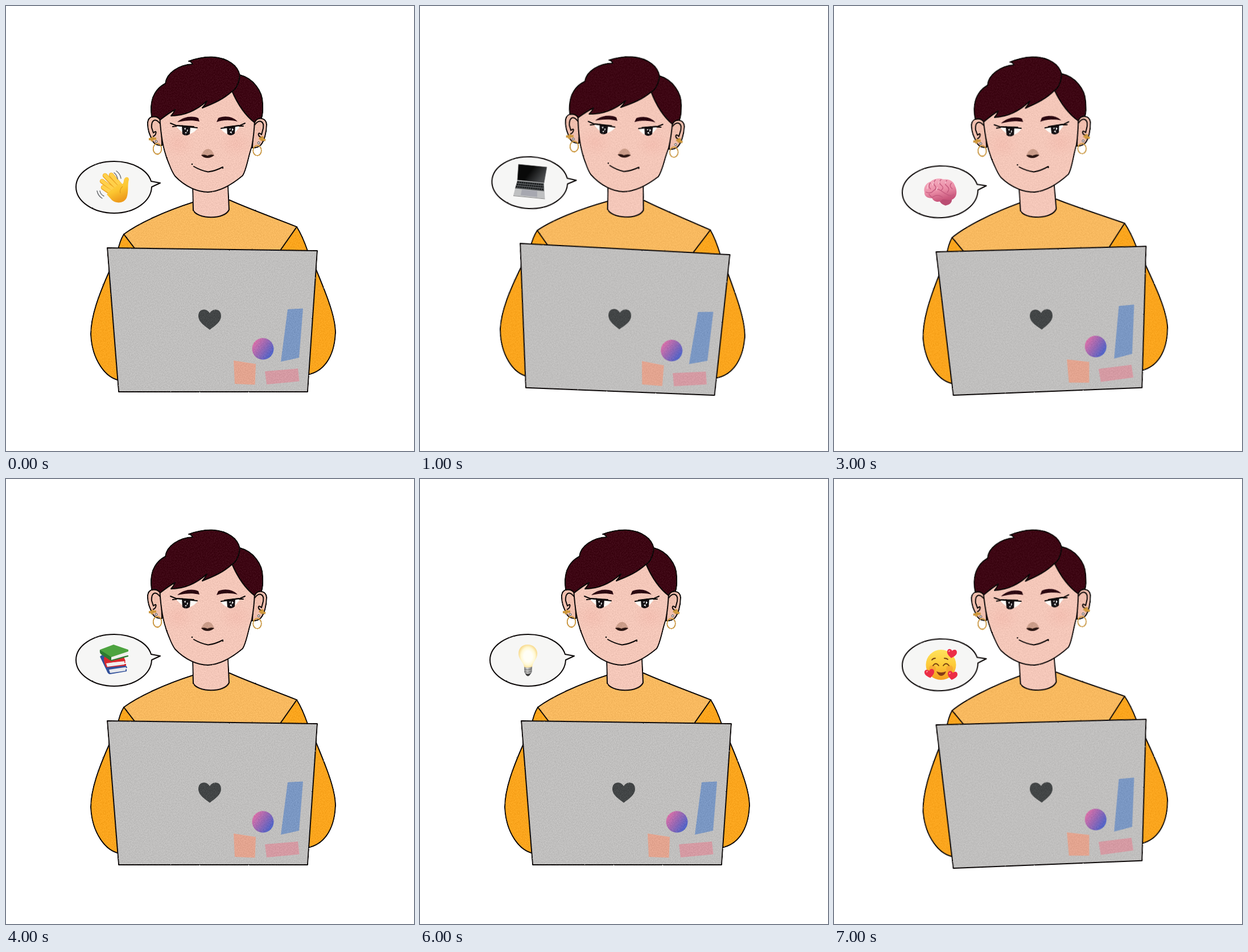
These frames come from a looping animation (717x782 px, 8000 ms). An HTML page:

```html
<!DOCTYPE html>
<html lang="en">
<head>
<meta charset="utf-8">
<title>Laptop greeting</title>
<style>
  html, body { margin: 0; width: 100%; height: 100%; overflow: hidden; background: #fff; }
  svg { display: block; width: 717px; height: 782px; }
  .ink { stroke: #0c0808; stroke-width: 2; stroke-linejoin: round; stroke-linecap: round; }
  .line { fill: none; }
  .skin { fill: #f4c7b9; }
  .ear { fill: #f0bfae; }
  .hair { fill: #3d0613; }
  .shirt { fill: #f8b95f; }
  .sleeve { fill: #fba51d; }
  .gold { fill: none; stroke: #cf983b; stroke-width: 2; }
  .icon { visibility: hidden; }
</style>
</head>
<body>
<svg viewBox="0 0 717 782" xmlns="http://www.w3.org/2000/svg">
  <defs>
    <filter id="grain" filterUnits="userSpaceOnUse" x="100" y="60" width="520" height="650" color-interpolation-filters="sRGB">
      <feTurbulence type="fractalNoise" baseFrequency=".35" numOctaves="1" seed="4" result="wave"/>
      <feDisplacementMap in="SourceGraphic" in2="wave" scale="1.8" xChannelSelector="R" yChannelSelector="G" result="rough"/>
      <feTurbulence type="fractalNoise" baseFrequency=".6" numOctaves="2" seed="9"/>
      <feColorMatrix values="1 0 0 0 0  1 0 0 0 0  1 0 0 0 0  0 0 0 0 1" result="dots"/>
      <feComposite in="rough" in2="dots" operator="arithmetic" k2="1" k3=".16" k4="-.08"/>
      <feComposite in2="rough" operator="in"/>
    </filter>
    <filter id="rough" filterUnits="userSpaceOnUse" x="100" y="250" width="190" height="130" color-interpolation-filters="sRGB">
      <feTurbulence type="fractalNoise" baseFrequency=".35" numOctaves="1" seed="2"/>
      <feDisplacementMap in="SourceGraphic" scale="1.8" xChannelSelector="R" yChannelSelector="G"/>
    </filter>
    <radialGradient id="blush">
      <stop stop-color="#ee9e92" stop-opacity=".2"/><stop offset="1" stop-color="#ee9e92" stop-opacity="0"/>
    </radialGradient>
    <linearGradient id="ball" x1="0" y1=".15" x2="1" y2=".85">
      <stop offset=".1" stop-color="#d66fa8"/><stop offset=".5" stop-color="#9367b4"/><stop offset=".9" stop-color="#4d63c8"/>
    </linearGradient>
    <linearGradient id="palm" x1="0" y1="0" x2=".4" y2="1">
      <stop stop-color="#ffd65a"/><stop offset=".6" stop-color="#fcc631"/><stop offset="1" stop-color="#ee9c1c"/>
    </linearGradient>
    <linearGradient id="smile" x2="0" y2="1">
      <stop stop-color="#ffe25c"/><stop offset=".5" stop-color="#fdcb3a"/><stop offset="1" stop-color="#f39c1f"/>
    </linearGradient>
    <radialGradient id="glass">
      <stop offset=".45" stop-color="#fffef6"/><stop offset=".75" stop-color="#fff8d3"/><stop offset="1" stop-color="#f8dd95"/>
    </radialGradient>
    <linearGradient id="pink" x2=".3" y2="1">
      <stop stop-color="#f7b3c4"/><stop offset=".6" stop-color="#ea8ca6"/><stop offset="1" stop-color="#c9577c"/>
    </linearGradient>
    <linearGradient id="screen" y2=".5">
      <stop offset=".5" stop-color="#090909"/><stop offset="1" stop-color="#4a4c4e"/>
    </linearGradient>
    <linearGradient id="metal">
      <stop stop-color="#777"/><stop offset=".35" stop-color="#d6d6d4"/><stop offset="1" stop-color="#777"/>
    </linearGradient>
    <path id="heart" d="M0,-11 C-4,-20 -20,-21 -20,-6 C-20,4 -9,11 0,18 C9,11 20,4 20,-6 C20,-21 4,-20 0,-11Z"/>
  </defs>

  <g id="figure">
    <g filter="url(#grain)">
      <!-- sleeves and shirt -->
      <g class="ink">
        <path class="sleeve" d="M207,401 Q200,412 196,432 L181,467 C163,508 149,545 149,577 C151,622 175,654 200,658 L240,640 L240,420Z"/>
        <path class="sleeve" d="M511,388 Q521,404 530,430 L545,463 C562,504 579,545 579,574 C577,620 556,643 530,648 L480,630 L480,420Z"/>
        <path class="shirt" d="M328,345 C281,360 232,382 207,401 L227,427 V480 H483 V428 L511,388 C468,371 424,355 393,341Z"/>
        <path class="skin" d="M328,314 L329,359 C337,375 384,376 392,358 L390,312Z"/>
      </g>

      <!-- ears -->
      <g class="ink ear">
        <path d="M273,202 C265,191 251,192 249,204 C248,219 254,229 258,238 Q263,246 274,245Z"/>
        <path d="M435,204 C443,194 457,196 458,208 C458,222 454,237 448,244 Q442,250 433,249Z"/>
        <path class="line" d="M271,207 C262,195 255,201 256,214 L259,223 C266,216 264,227 259,229"/>
        <path class="line" d="M437,209 C445,198 454,202 452,215 L449,226 C442,219 442,229 448,231"/>
      </g>
      <path class="ink skin" d="M270,193 C272,224 275,252 287,279 Q292,292 297,299 C315,318 337,327 355,327 C376,326 397,314 416,298 C423,287 425,267 432,247 Q436,226 437,200 L398,140 H310Z"/>
      <ellipse cx="302" cy="242" rx="30" ry="25" fill="url(#blush)"/>
      <ellipse cx="404" cy="242" rx="30" ry="25" fill="url(#blush)"/>

      <!-- hair -->
      <g class="ink hair">
        <path d="M411,121 C434,127 451,149 451,171 Q452,190 449,197 Q440,197 437,205 C420,192 406,170 397,149Z"/>
        <path d="M271,200 Q265,192 256,195 C252,168 258,148 280,136 C282,118 304,103 328,102 Q325,97 321,97 C350,86 377,87 396,100 Q408,108 411,122 C409,136 405,146 397,150 C382,164 365,171 345,179 Q350,174 353,167 C334,184 312,193 290,193 Q295,188 297,182 Q286,188 271,200Z"/>
      </g>

      <!-- brows and eyes -->
      <g fill="#2b0710">
        <path d="M301,204 C311,195 326,192 338,197 L340,203 C327,200 315,201 301,204Z"/>
        <path d="M370,204 L373,197 C384,192 399,194 407,203 C394,200 382,200 370,204Z"/>
      </g>
      <path fill="#fffaf6" d="M298,210 L337,214 Q331,224 318,226 Q307,222 298,210Z M412,209 L377,215 Q384,226 395,226 Q406,222 412,209Z"/>
      <g fill="#151114">
        <path d="M309,210 L324,212 L323,225 Q316,230 310,225Z M388,212 L403,210 L402,224 Q396,230 389,225Z"/>
        <path class="ink line" d="M289,206 L299,210 L336,214 M293,212 L300,211 M420,206 L411,210 L378,215 M417,211 L410,211"/>
        <path class="ink line" stroke-width="3" d="M301,210 L330,212 M409,210 L384,213"/>
      </g>
      <path fill="#fff" d="M313,215 l3,-1 l-1,4Z M318,217 l2,1 l-2,4Z M314,223 l3,-2 l0,3Z M392,216 l3,-1 l-1,3Z M397,215 l3,2 l-3,3Z M393,222 l3,-2 l1,4Z"/>

      <!-- nose and mouth -->
      <path fill="#ca9c89" d="M343,263 Q347,252 355,251 Q363,252 366,263 Q355,269 343,263Z"/>
      <path fill="#2a1512" d="M343,262 Q349,260 354,263 Q360,260 366,262 Q361,267 354,267 Q347,267 343,262Z"/>
      <path class="ink line" d="M330,282 Q342,289 355,291.500 Q368,290 381,283 l0,2"/>
      <circle cx="327" cy="278" r="1.2"/>

      <!-- earrings -->
      <g class="gold">
        <ellipse cx="266" cy="251" rx="7.3" ry="9.3"/>
        <ellipse cx="441.5" cy="254" rx="7.3" ry="9"/>
        <path stroke-width="4" d="M251,234 L264,233 M258,230 L256,238 M445,232 L456,236 M451,229 L449,237"/>
      </g>
      <g fill="#ddd" stroke="#555">
        <circle cx="264" cy="238" r="2"/><circle cx="444" cy="240.5" r="2"/>
      </g>

      <!-- laptop lid -->
      <path class="ink" fill="#c0bfbe" d="M178,425 L547,430 L530,678 H198Z"/>
      <use href="#heart" x="358" y="551" fill="#424546"/>
      <path fill="#7a97c3" d="M495,533 L522,531.5 L515,618 L483,625Z"/>
      <circle cx="451.5" cy="602.5" r="19" fill="url(#ball)"/>
      <path fill="#e3a48f" d="M400,623 L439,629 L437.500,665.500 L402,664Z"/>
      <path fill="#d59aa3" d="M455,642 L513,637 L515.500,659.500 L458,665Z"/>
    </g>
  </g>

  <g id="bubble">
    <path class="ink" filter="url(#rough)" fill="#f6f6f5" d="M255,308 L271,311 L256,318 C255,343 227,364 190,364 C153,364 123,343 123,318 C123,293 153,273 190,273 C222,273 249,288 255,308Z"/>

    <g class="icon" id="wave">
      <g fill="none" stroke-linecap="round">
        <path stroke="#eda323" stroke-width="8.5" d="M203,318 L185,297 M196,321 L174,298 M191,325 L169,308 M190,332 L171,319"/>
        <path stroke="#ffd04a" stroke-width="6.5" d="M203,317 L185,296.500 M196,320 L174,297.500 M191,324 L169,307.500 M190,331 L171,318.500"/>
      </g>
      <path fill="url(#palm)" d="M183,325 L200,312 Q206,316 207,307 C208,299 216,299 216,305 C213,315 216,326 212,337 C207,348 192,347 186,341 L177,331Z"/>
      <path fill="none" stroke="#e29a1f" stroke-width="1.2" d="M205,317 Q199,322 201,329"/>
      <path fill="none" stroke="#66696c" stroke-width="1.4" stroke-linecap="round" d="M190,293 Q195,297 196,304 M194,290 Q201,295 202,303 M160,325 Q162,334 169,338 M165,325 Q166,331 172,334"/>
    </g>

    <g class="icon" id="computer">
      <path fill="url(#screen)" stroke="#8b8b8b" stroke-width=".8" d="M173,278 L223,283 L218,311 L171,306Z"/>
      <path fill="#bfc0c1" d="M171,306 L218,311 L219.500,338.500 L164,333Z"/>
      <path fill="#55585a" d="M171,307 L217.500,311.500 L218,325.500 L167,320.500Z"/>
      <path fill="none" stroke="#17191a" stroke-width="2.4" stroke-dasharray="3 .8" d="M171,309.500 L217,314 M170,313.500 L217,318 M168.500,317.500 L217.500,322.500"/>
      <path fill="#a7a8b0" d="M179,322.500 L206,325 L206,335.500 L177,332.500Z"/>
      <path stroke="#888" d="M164,333.500 L219.500,339"/>
    </g>

    <g class="icon" id="brain">
      <path fill="#ba4d72" d="M186,331 Q206,324 210,332 Q209,342 198,343 Q189,340 186,331Z"/>
      <path fill="url(#pink)" d="M162,318 C160,309 166,302 173,300 C180,294 191,294 197,297 C208,296 214,302 216,309 C220,318 219,328 212,332 C205,335 198,331 193,332 C187,339 177,335 175,329 C167,329 161,325 162,318Z"/>
      <path fill="none" stroke="#c75d80" stroke-width="1.5" stroke-linecap="round" d="M165,318 Q173,322 178,316 T193,318 T211,326 M173,302 Q168,308 173,313 M182,297 Q176,303 182,309 Q183,314 178,316 M192,297 Q186,302 192,307 T191,316 M202,299 Q196,304 202,309 T202,320 M210,304 Q205,309 211,314 M175,328 Q184,321 193,328 M170,322 L174,327 M202,324 Q207,329 213,324"/>
      <path fill="none" stroke="#fbd0da" stroke-width="1.3" stroke-linecap="round" d="M169,305 L167,312 M179,301 L177,306 M189,300 L188,304 M200,301 L199,304 M185,311 L183,315"/>
    </g>

    <g class="icon" id="books">
      <path fill="#31509a" d="M165,312 L169,309 L212,329 L213,332 L184,336 L212,334 V338 L183,343 Q179,343 177,337Z"/>
      <path fill="#e6e8ec" d="M181,335 L211,330.500 L210,337 L183,341Z"/>
      <path fill="#d9282d" d="M173,312 Q170,319 176,331 L211,328 V325 L178,326 L210,323 L206,310Z"/>
      <path fill="#f1eeee" d="M176,324 L208,319 L208,326 L178,330Z"/>
      <path fill="#d9282d" d="M173,311 L177,323 L210,320 L206,310Z"/>
      <path fill="#2d7a31" d="M165,300 Q164,305 167,308 L185,320 L215,312 V310 L187,312Z"/>
      <path fill="#f0f0ec" d="M185,312 L214,303 L213,310 L185,318Z"/>
      <path fill="#4da33f" d="M165,300 L189,291 L215,300 V303 L185,313Z"/>
    </g>

    <g class="icon" id="bulb">
      <path fill="url(#glass)" d="M177,299 C177,288 184,283 193,283 C203,283 210,290 210,299 C210,309 201,314 200,323 Q193,326 186,323 C186,314 177,309 177,299Z"/>
      <path fill="url(#metal)" d="M186,322 Q193,325 200,322 L199,332 L195,336 H190 L186,332Z"/>
      <path fill="none" stroke="#737373" d="M186,326 Q193,329 199.500,325.500 M186,330 Q193,333 199,329.500"/>
      <path fill="#3c3c3c" d="M187,333 Q193,336 198,333 L195,337 Q192,340 189,337Z"/>
    </g>

    <g class="icon" id="love">
      <circle cx="188" cy="326.500" r="26.500" fill="url(#smile)"/>
      <g fill="#f28a32" opacity=".4"><circle cx="173" cy="333" r="6"/><circle cx="203" cy="333" r="6"/></g>
      <path fill="none" stroke="#7a4312" stroke-width="1.8" stroke-linecap="round" d="M174,328 Q179,321 184,328 M192,328 Q197,321 202,328 M172,318 Q174,315 178,315 M194,315 Q198,315 200,317"/>
      <path fill="#843a17" d="M180,338 Q188,342 197,338 Q194,346 188,346 Q183,345 180,338Z"/>
      <g fill="#ec2d46">
        <use href="#heart" transform="translate(207 307) rotate(8) scale(.43)"/>
        <use href="#heart" transform="translate(168 342) rotate(-10) scale(.43)"/>
        <use href="#heart" transform="translate(208 345.500) rotate(10) scale(.43)"/>
      </g>
      <path stroke="#ff8c98" stroke-width="2" stroke-linecap="round" d="M202,303 l1,-1 M163,339 l1,-1 M203,342 l1,-1"/>
    </g>
  </g>
</svg>
<script>
  const STEP = 1000, TILT = 2.3;
  const steps = [
    [0, 'wave'], [1, 'computer'], [0, 'brain'], [-1, 'brain'],
    [0, 'books'], [1, 'bulb'], [0, 'bulb'], [-1, 'love']
  ];
  const byId = id => document.getElementById(id);
  const icons = [...document.querySelectorAll('.icon')];
  const turn = (id, side, x, y) =>
    byId(id).setAttribute('transform', `rotate(${side * TILT} ${x} ${y})`);
  const turnBubble = (id, side) => turn(id, side, 390, 398);

  function pose(side) {
    // Leaning left swings from a slightly higher point on the neck's left.
    if (side < 0) turn('figure', side, 354, 392);
    else turn('figure', side, 372, 373);
    turnBubble('bubble', side);
  }

  // These icons are drawn upright in a tilted pose.
  turnBubble('computer', -1);
  turnBubble('bulb', -1);
  turnBubble('love', 1);

  const start = performance.now();
  let shown = -1;

  function draw() {
    const i = Math.floor((performance.now() - start) / STEP) % steps.length;
    if (i !== shown) {
      const [side, name] = steps[i];
      pose(side);
      for (const icon of icons) icon.style.visibility = icon.id === name ? 'visible' : 'hidden';
      shown = i;
    }
    requestAnimationFrame(draw);
  }
  draw();
</script>
</body>
</html>
```
